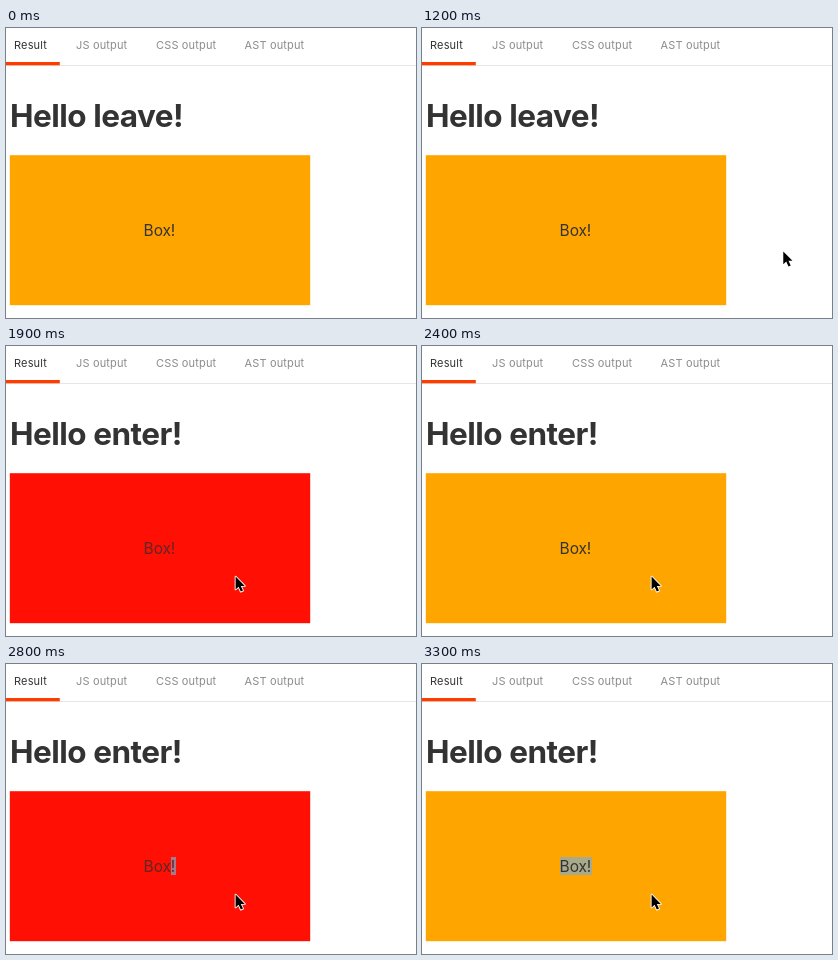
Animation, 410 px wide and 290 px high, one loop 3.5 s. Source, as an HTML page:

```html
<!DOCTYPE html>
<html lang="en">
<head>
<meta charset="utf-8">
<title>Box events</title>
<style>
  html, body { margin: 0; width: 100%; height: 100%; overflow: hidden; background: #fff; }
  svg { display: block; width: 410px; height: 290px; }
  text { white-space: pre; }
  .tab { font: 11px Inter, sans-serif; letter-spacing: .15px; fill: #8c8c8c; }
  .on { fill: #333; }
  .title { font: 700 31.5px Inter, sans-serif; letter-spacing: -.5px; fill: #333; }
  .label { font: 15.5px Inter, sans-serif; letter-spacing: -.1px; }
  .cursor { fill: #000; stroke: #fff; stroke-width: 1.8; stroke-linejoin: round; paint-order: stroke; }
</style>
</head>
<body>
<svg viewBox="0 0 410 290">
  <rect width="410" height="290" fill="#fff"/>
  <rect y="37" width="410" height="1" fill="#e6e6e6"/>
  <rect y="34" width="53.8" height="3.3" fill="#ff3c00"/>
  <text class="tab on" x="8" y="21">Result</text>
  <text class="tab" x="70" y="21">JS output</text>
  <text class="tab" x="150" y="21">CSS output</text>
  <text class="tab" x="238.5" y="21">AST output</text>
  <text class="title" id="title" x="4" y="98.5"></text>
  <rect id="box" x="3.8" y="127.2" width="300.4" height="150"/>
  <rect id="mark" y="193" height="18"/>
  <text class="label" id="label" x="137.6" y="208">Box!</text>
  <path class="cursor" id="arrow" d="M0 0V12.8L3 10.1L5.2 15L7.4 14L5.2 9.3H9.2Z"/>
  <path class="cursor" id="resize" d="M-6 -6H-.5L-2.3 -4.2L4.2 2.3L6 .5V6H.5L2.3 4.2L-4.2 -2.3L-6 -.5Z"/>
</svg>
<script>
const LOOP = 3500, STEP = 100;
const $ = id => document.getElementById(id);
const [title, box, mark, label, arrow, resize] =
  ['title', 'box', 'mark', 'label', 'arrow', 'resize'].map($);

// Pointer sweeps: start, end, from, to
const sweeps = [
  [100, 400, [343, 233], [230, 223]],
  [500, 900, [230, 223], [369, 223]],
  [1100, 1800, [369, 223], [229.6, 230.6]]
];
const presses = [[1900, 2400], [2600, 2700], [2800, 2900], [3200, 3300]];

const within = (t, [a, b]) => t >= a && t < b;
const ease = u => u * u * (3 - 2 * u);

function pointer(t) {
  let p = sweeps[0][2];
  for (const [a, b, from, to] of sweeps) {
    if (t < a) break;
    const u = ease(Math.min(1, (t - a) / (b - a)));
    p = from.map((v, i) => v + (to[i] - v) * u);
  }
  return p;
}

function place(node, x, y, shown) {
  node.setAttribute('transform', `translate(${x} ${y})`);
  node.setAttribute('visibility', shown ? 'visible' : 'hidden');
}

function draw(ms) {
  const t = Math.floor(ms % LOOP / STEP) * STEP;
  const [x, y] = pointer(t);
  const down = presses.some(p => within(t, p));
  const sizing = within(t, [700, 800]);

  title.textContent = t >= 100 && x < 304 ? 'Hello enter!' : 'Hello leave!';
  box.setAttribute('fill', down ? '#ff0f04' : '#ffa500');
  label.setAttribute('fill', down ? '#5e2826' : '#333');

  const start = t >= 3200 ? 138 : 165;
  mark.setAttribute('x', start);
  mark.setAttribute('width', t >= 2800 ? 170 - start : 0);
  mark.setAttribute('fill', down ? '#a47b8e' : '#a9aa8c');

  place(arrow, x, y, t >= 100 && !sizing);
  place(resize, 266, 231, sizing);
}

function tick(now) {
  draw(now);
  requestAnimationFrame(tick);
}
draw(0);
requestAnimationFrame(tick);
</script>
</body>
</html>
```
